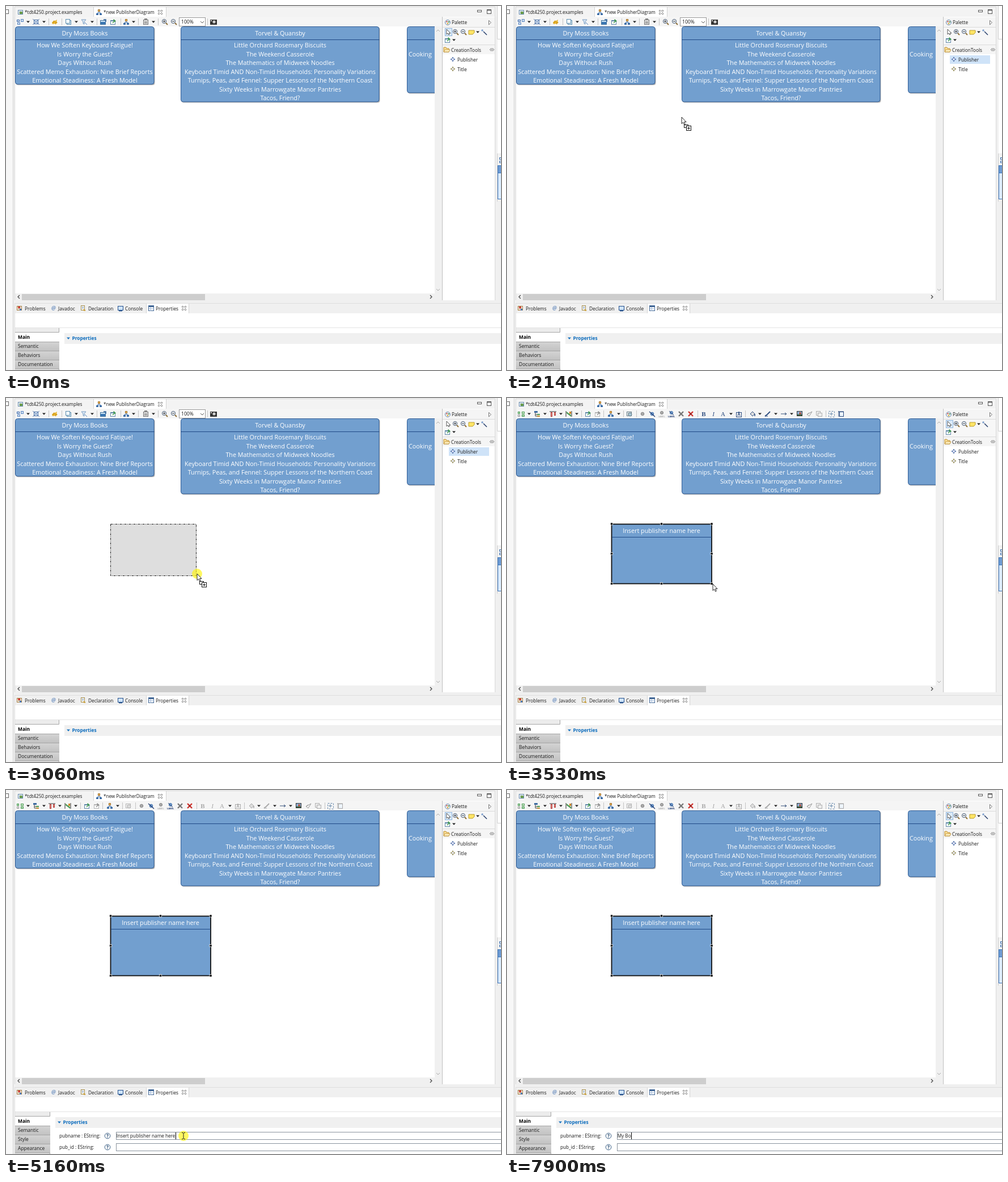
Write an HTML page that moves like this. It is 873x642 px and loops after 8 s.

```html
<!DOCTYPE html>
<html lang="en">
<head>
<meta charset="utf-8">
<title>Diagram editor</title>
<style>
  html, body { margin: 0; width: 100%; height: 100%; overflow: hidden; background: #f0f0f0; }
  svg { display: block; width: 873px; height: 642px; }
  text { font-family: "Open Sans", "Noto Sans", sans-serif; white-space: pre; }
</style>
</head>
<body>
<svg id="stage" viewBox="0 0 873 642"></svg>
<script>
const BLUE = '#729fcf', NAVY = '#204a87', INK = '#1a1a1a', GRAY = '#a8a8a8';
const LOOP = 8000;

// --- drawing helpers ---
const rect = (x, y, w, h, fill, more = '') =>
  `<rect x="${x}" y="${y}" width="${w}" height="${h}" fill="${fill}" ${more}/>`;
const frame = (x, y, w, h, stroke, fill = 'none', more = '') =>
  rect(x + .5, y + .5, w - 1, h - 1, fill, `stroke="${stroke}" ${more}`);
const path = (d, stroke, width = 1, fill = 'none') =>
  `<path d="${d}" stroke="${stroke}" stroke-width="${width}" fill="${fill}"/>`;
const shape = (d, fill) => path(d, 'none', 0, fill);
const dot = (x, y, r, fill, stroke = 'none') =>
  `<circle cx="${x}" cy="${y}" r="${r}" fill="${fill}" stroke="${stroke}"/>`;
const text = (s, x, y, size = 8.3, fill = INK, more = '') =>
  `<text x="${x}" y="${y}" font-size="${size}" fill="${fill}" ${more}>${s.replace(/&/g, '&amp;')}</text>`;
const label = (s, x, y, size = 10.8) => text(s, x, y, size, '#fff', 'text-anchor="middle"');
const group = (id, body, more = '') => `<g id="${id}" ${more}>${body}</g>`;

const boxes = (a, b) => frame(-6, -4, 5, 4, a, '#dce8f6') + frame(1, -5, 5, 5, b, '#cfe0f4') + frame(-5, 1, 5, 4, b, '#dce8f6');
const tree = c => frame(-2, -5, 4, 4, '#a06a20', '#f2c46a') + path('M0-1V1M-3 3V1H3V3', c) + rect(-5, 2, 4, 3, c) + rect(1, 2, 4, 3, c);
const pin = (c, edge) => frame(-5, -3, 9, 8, edge, '#fff') + rect(-5, -3, 9, 2, edge) + path('M-1 2L3-2', c, 1.5) + shape('M1-5L5-1L3 0L0-3Z', c);
const lens = sign => dot(-1, -1, 3.6, '#eef4fb', '#4a5a70') + path('M2 2L5 5', '#8a6a30', 1.8) + path(sign, '#333');
const letter = (s, c, style) => text(s, 0, 4, 11, c, `text-anchor="middle" style="font-family:'Liberation Serif',serif;${style}"`);
const cross = c => path('M-4-4L4 4M4-4L-4 4', c, 2.4);
const page = c => frame(-5, -4, 9, 8, c, '#fff') + path('M-3-1H2M-3 1H2', c);

const icons = {
  down: () => shape('M-3-1.5H3L0 1.7Z', '#222'),
  sep: () => path('M.5-6V6', '#c4c4c4'),
  layout: () => boxes('#3a66a8', '#5b86c0'),
  select: () => frame(-4, -4, 8, 8, '#4a6fa5', '#dfeaf7') + path('M-6-5L6 5M6-5L-6 5', '#4a6fa5', .8),
  refresh: () => shape('M-5 1L-1-3V-1L4-4L3 0L5 1L1 5V3L-4 4Z', '#e7b32c') + path('M-4 2L0-2M0 3L4 0', '#a87510', .8),
  layers: () => frame(-3, -3, 8, 8, '#5e8fb0', '#e8f4f8') + frame(-5, -5, 8, 8, '#5e8fb0', '#f2fafc'),
  filter: () => path('M-5-4H3L0 0V4L-2 3V0Z', '#7d9fc4', 1, '#d8e6f4') + path('M1 1L5 5', '#5b86c0'),
  image: () => frame(-5, -3, 10, 8, '#41719c', '#cfe6f6') + rect(-4, 0, 8, 4, '#3c78b4') + path('M1-4H5V0', '#2c5f96', 1.5),
  pin: () => pin('#3f9a4e', '#5f87a8'),
  pinOff: () => pin('#909090', '#b5b5b5'),
  tree: () => tree('#3d6ea8'),
  clip: () => frame(-4, -4, 9, 9, '#777', '#ddd') + rect(-2, -6, 5, 3, '#888') + path('M-2 0H3M-2 2H3', '#777'),
  zoomIn: () => lens('M-3-1H1M-1-3V1'),
  zoomOut: () => lens('M-3-1H1'),
  camera: () => rect(-6, -4, 12, 9, '#333') + dot(1, 0, 2.5, '#ddd', '#888') + rect(-5, -3, 2, 2, '#ddd'),
  green: () => frame(-6, -4, 4, 4, '#4b9a55', '#b9e0b8') + frame(1, -4, 5, 4, '#4b9a55', '#d6efd2') + frame(1, 1, 5, 4, '#4b9a55', '#b9e0b8') + frame(-6, 1, 4, 4, '#999', '#eee'),
  list: () => rect(-5, -5, 6, 3, '#3b6aa0') + path('M-3-2V4H0M-3 1H0', '#444') + rect(0, 0, 5, 2, '#4c9a50') + rect(0, 3, 5, 2, '#c08a30'),
  align: () => path('M-6-4H6', '#333') + frame(-4, -3, 3, 8, '#b03030', '#f0b0a0') + frame(2, -3, 3, 6, '#b03030', '#f0b0a0'),
  spread: () => path('M-5-5V5M5-5V5', '#333') + shape('M-4-4L4 2V5L-4-1Z', '#4d9a54') + rect(1, -4, 3, 4, '#d48a2a'),
  picture: () => page('#5c7480') + dot(1, 1, 3, '#a9c7d6', '#5c7480'),
  pictureOff: () => page('#b0b0b0') + dot(1, 1, 3, '#ddd', '#b0b0b0'),
  ball: () => dot(0, 0, 2.8, '#aaa', '#888'),
  hide: () => dot(0, 0, 2.8, '#7ba5d6', '#3d6ea8') + path('M-5-4L5 5', '#203a70', 1.3),
  tagOff: () => dot(0, -2, 2.6, '#aaa', '#888') + text('LABEL', -6, 6, 4, '#888'),
  tag: () => dot(0, -2, 2.6, '#7ba5d6', '#3d6ea8') + path('M-4-5L4 2', '#203a70') + text('LABEL', -6, 6, 4, '#203a70', 'font-weight="700"'),
  cross: () => cross('#777'),
  crossRed: () => cross('#d0302a') + dot(0, 0, 1.5, '#803030'),
  bold: c => letter('B', c, 'font-weight:700'),
  italic: c => letter('I', c, 'font-style:italic'),
  font: c => letter('A', c, ''),
  fontBox: c => frame(-5, -3, 10, 9, c) + path('M-2 4L0-4L2 4M-1 1H1', c),
  bucket: c => path('M-4 0L0-4L4 0L0 4Z', c, 1, '#ddd') + path('M4 0V4', c, 1.5),
  brush: c => path('M-5 4L-1 1L4-4', c, 1.8) + path('M-5 4H0', c),
  line: () => path('M-5 0H5M2-2L5 0L2 2', '#35507a'),
  photo: () => frame(-5, -5, 10, 9, '#333', '#8fb3d9') + dot(1, -1, 2, '#b0503a') + rect(-4, 1, 8, 2, '#3b5f3b'),
  undo: () => path('M5-4L-4 1L0 4M-4 1L0-2M5-4L0 4', '#999'),
  copy: () => frame(-5, -5, 8, 8, '#b0b0b0', '#eee') + frame(-2, -2, 8, 7, '#b0b0b0', '#eee'),
  expand: () => frame(-5, -5, 11, 11, '#6486aa', 'none', 'stroke-dasharray="3 2"') + path('M-3 0H3M0-3V3', '#6486aa'),
  resize: c => frame(-3, -4, 8, 9, c, '#eef5fc') + path('M-5-4H5M-4-5V5', c),
  close: () => path('M-3.5-3.5H-1.5L0-1.5L1.5-3.5H3.5V-2L1.8 0L3.5 2V3.5H1.5L0 1.5L-1.5 3.5H-3.5V2L-1.8 0L-3.5-2Z', '#777', .9, '#fff'),
  file: () => page('#5f87a8') + rect(-2, -1, 5, 4, '#6fa04a'),
  scroll: () => frame(-4, -5, 7, 9, '#a08a4a', '#fff') + path('M-2-2H1M-2 0H1', '#6f8db0') + path('M0 3L4 4', '#c89a2c', 2),
  at: () => text('@', -4, 3, 9, '#2f62a8', 'font-style="italic"'),
  monitor: () => frame(-5, -4, 10, 8, '#24508c', '#cfe4fa') + rect(-3, 4, 6, 1.4, '#24508c'),
  table: () => frame(-5, -5, 10, 10, '#3f6595', '#fff') + rect(-5, -5, 10, 3, '#3f6595') + path('M-1-2V5M-4 1H5', '#9db6d6'),
  alert: () => page('#a07838') + rect(-3, -3, 4, 3, '#d0403a') + rect(0, 1, 3, 3, '#4a78b8'),
  star: c => path('M0-4L1.2-1.2L4 0L1.2 1.2L0 4L-1.2 1.2L-4 0L-1.2-1.2Z', c, .9, '#eef'),
  arrow: () => path('M-3-5V4L-1 2L1 5L2 4L1 2H4Z', '#444', .9, '#fff'),
  note: () => path('M-5-3H5V1L2 4H-5Z', '#b99b2a', 1, '#ffe566'),
  wand: () => path('M-1-1L5 5', '#223a66', 1.4) + path('M-5-3H-1M-3-5V-1', '#5b86c0'),
  folder: () => path('M-5 4V-4H-1L0-2H4V4Z', '#b98a2c', 1, '#ffe39a') + path('M-5 4L-3 0H6L4 4Z', '#b98a2c', .8, '#fff0c0'),
  palette: () => dot(0, 0, 4.5, '#e9eef5', '#6f8db0') + dot(-1.5, -1.5, 1.3, '#d05a4a') + dot(2, -1, 1.3, '#4f9a54') + dot(0, 2, 1.3, '#e0b030'),
  help: () => dot(0, 0, 4.8, '#fff', '#3a5f86') + text('?', -2.1, 3.2, 8.5, '#24486e', 'font-weight="700"')
};
const icon = (name, x, y, color) => `<g transform="translate(${x} ${y})">${icons[name](color)}</g>`;
const bar = (spec, color) => spec.split(' ').map(item => {
  const [name, x] = item.split(':');
  return icon(name, +x, 28, color);
}).join('');

// --- diagram ---
const node = (x, w, h, title, lines, top = 73) => {
  const mid = x + w / 2;
  return rect(x + 1.5, 37.5, w - 1, h, '#b4b4b4', 'rx="4"') +
    rect(x + .5, 36.5, w - 1.5, h - .5, BLUE, `rx="4" stroke="#2f5c96"`) +
    path(`M${x} 59.5h${w - .5}`, NAVY) + label(title, mid, 52) +
    lines.map((s, i) => label(s, mid, top + i * 15.5)).join('');
};
const handles = () => [184.5, 272.5, 361].map(x => [222, 274.5, 327.5].map(y =>
  x === 272.5 && y === 274.5 ? '' : rect(x - 2, y - 2, 4, 4, '#000', 'stroke="#fff" stroke-width=".7"')).join('')).join('');

const diagram = rect(16, 36, 740, 471, '#fff') +
  `<clipPath id="view"><rect x="16" y="36" width="740" height="471"/></clipPath><g clip-path="url(#view)">` +
  node(16, 246, 102, 'Dry Moss Books', ['How We Soften Keyboard Fatigue!', 'Is Worry the Guest?', 'Days Without Rush',
    'Scattered Memo Exhaustion: Nine Brief Reports', 'Emotional Steadiness: A Fresh Model']) +
  node(308, 351, 133, 'Torvel & Quansby', ['Little Orchard Rosemary Biscuits', 'The Weekend Casserole',
    'The Mathematics of Midweek Noodles', 'Keyboard Timid AND Non-Timid Households: Personality Variations',
    'Turnips, Peas, and Fennel: Supper Lessons of the Northern Coast', 'Sixty Weeks in Marrowgate Manor Pantries',
    'Tacos, Friend?']) +
  node(707, 240, 117, '', []) + text('Cooking', 710, 88.5, 10.8, '#fff') +
  '</g>' +
  group('created', rect(184.5, 222.5, 176.5, 105, BLUE, 'stroke="#111" stroke-width="1.8"') +
    path('M185 245.5H361', NAVY) + label('Insert publisher name here', 272.5, 238) + handles());

// --- surrounding window ---
const tabs = rect(0, 0, 12, 642, '#f7f7f7') + path('M12.5 0V642', '#d2d2d2') + frame(-4, 6, 9, 8, '#666', '#fff') +
  rect(13, 0, 854, 19, '#f3f3f3') + path('M15.5 1V519M16 1.5H862M862.5 1V519', '#d8d8d8') +
  rect(155, 2, 127, 17, '#fff') + path('M154.5 2V19M282.5 2V19', '#d4d4d4') +
  icon('file', 26, 11) + text('*tdt4250.project.examples', 33, 14, 8.2) +
  icon('tree', 164, 11) + text('*new PublisherDiagram', 172, 14, 8.1) + icon('close', 272, 11) +
  frame(831, 7, 8, 4, '#555', '#fff') + frame(848, 6, 8, 8, '#555', '#fff') + path('M848 7.5H856', '#555') +
  rect(16, 19, 754, 17, '#f5f5f5');

const toolbarIdle = bar('layout:25 down:39 select:53 down:67 sep:75 refresh:86 sep:98 layers:110 down:124 filter:138 down:152 sep:160 image:171 pin:189 sep:202 tree:212 down:225 sep:233 clip:246 down:260 sep:268 zoomIn:280 zoomOut:296 sep:355 camera:366') +
  frame(305, 20, 47, 16, '#999', '#fff') + text('100%', 309, 31, 8.6) + path('M343 27L346 30L349 27', '#555');
const toolbarNode = bar('green:25 down:39 list:53 down:67 align:81 down:95 spread:109 down:123 sep:131 pin:143 pinOff:160 sep:170 tree:183 down:197 sep:205 sep:228 ball:239 hide:256 tagOff:273 tag:290 cross:307 crossRed:324 sep:336 down:395 sep:420 down:446 down:474 line:488 down:502 photo:516 undo:533 copy:550 sep:562 expand:572');
const STYLES = 'bold:347 italic:364 font:381 fontBox:409 bucket:433 brush:460 resize:589 ';

const scrollbars = rect(756, 36, 13, 483, '#f0f0f0') + rect(16, 507, 740, 12, '#f0f0f0') +
  rect(28, 508, 323, 11, '#cdcdcd') +
  path('M24 510L21 513L24 516M748 510L751 513L748 516', '#444', 1.3) +
  path('M759 45L762 42L765 45M759 499L762 502L765 499', '#aaa');

const palette = rect(770, 19, 92, 500, '#fff') + path('M769.5 19V519', '#c0c0c0') +
  rect(770, 20, 92, 17, '#f5f5f5') + icon('palette', 779, 29) + text('Palette', 786, 32, 8.4) +
  path('M851.5 25.5V33L855.5 29.2Z', '#666', .9, '#fff') + path('M770 37.5H862M770 68.5H862', '#dadada') +
  rect(770, 38, 92, 30, '#f7f7f7') +
  group('pointerTool', frame(774, 39, 13, 14, '#8eb4dc', '#dcebfa')) + icon('arrow', 780, 46) +
  icon('zoomIn', 793, 46) + icon('zoomOut', 807, 46) + icon('note', 821, 46) + icon('down', 832, 46) + icon('wand', 843, 46) +
  icon('pin', 779, 60) + icon('down', 790, 60) +
  rect(770, 69, 92, 16, '#f5f5f5') + icon('folder', 777, 77) + text('CreationTools', 785, 80.5) +
  path('M853 77L856 74.5V79.5ZM861 77L858 74.5V79.5Z', '#777', .8) +
  group('picked', rect(781, 87, 71, 15, '#cfe3f8')) +
  icon('star', 788, 94, '#3a5f9c') + text('Publisher', 796, 97.5, 8.2) +
  icon('star', 788, 111, '#8a8140') + text('Title', 796, 114.5, 8.5);

const edge = rect(867, 0, 6, 260, '#fff') + path('M866.5 0V58M866.5 58.5H873M866.5 260V345', '#cfcfcf') +
  rect(868, 262, 5, 18, '#f5f5f5') + frame(870, 267, 5, 4, '#3a6fb0') + frame(870, 273, 5, 4, '#3a6fb0') +
  frame(867, 281, 10, 60, '#3a75bd', '#dcecfc') + rect(868, 282, 5, 12, '#6d9bd3') + path('M867 294.5H873', '#3a75bd');

const views = rect(13, 519, 860, 23, '#f0f0f0') + path('M15.5 524V642M16 524.5H873', '#dedede') +
  rect(248, 525, 74, 17, '#fff') + path('M247.5 525V542M322.5 525V542', '#d4d4d4') +
  [['alert', 24, 'Problems', 33], ['at', 84, 'Javadoc', 92], ['scroll', 136, 'Declaration', 145], ['monitor', 202, 'Console', 210], ['table', 256, 'Properties', 264]]
    .map(([name, x, s, left]) => icon(name, x, 533) + text(s, left, 536.5)).join('') + icon('close', 314, 533) +
  rect(16, 542, 857, 100, '#fff') + path('M16 567.5H873', '#e4e4e4');

const sheet = (id, right, names) => group(id,
  rect(16, 568, right - 16, 7, '#ececec') + path(`M16 575.5H${right - .5}V568M${right - .5} 592V642`, '#a5a5a5') +
  text('Main', 21, 586.5, 8.4, '#000', 'font-weight="700"') +
  names.map((s, i) => rect(16, 592 + 16 * i, right - 16, 16, 'url(#sideTab)') +
    path(`M16 ${592.5 + 16 * i}H${right}`, '#a5a5a5') + text(s, 21, 603 + 16 * i, 8.5)).join('') +
  path(`M16 640.5H${right}`, '#a5a5a5') +
  rect(right + 9, 577, 873, 19, '#f0f0f0') + shape(`M${right + 13} 584.5h6l-3 3.6z`, '#1a74c0') +
  text('Properties', right + 22.5, 589, 8.3, '#0b6cbd', 'font-weight="700"'));

const field = (y, s) => text(s, 94, y + 3.2, 8.2) + icon('help', 179, y) + frame(194, y - 7, 690, 14, '#8a949e', '#fff');
const form = group('form', field(610, 'pubname : EString:') + field(630, 'pub_id : EString:') +
  text('', 194.7, 613.2, 8.2, INK, 'id="value"') +
  group('selection', rect(194.5, 604, 104, 12, '#0078d7') +
    text('Insert publisher name here', 194.7, 613.2, 8.2, '#fff'), 'clip-path="url(#marked)"') +
  '<clipPath id="marked"><rect id="markedBox" y="600" height="20" width="200"/></clipPath>' +
  rect(0, 604, 1, 12, '#000', 'id="caret"'));

const pointer = rect(184.5, 222.5, 1, 1, '#dedede', 'id="band" stroke="#222" stroke-dasharray="4 1.5 1 1.5"') +
  group('pointer', dot(0, 0, 9, 'rgba(255,245,20,.68)').replace('<circle', '<circle id="glow"') +
    group('arrow', path('M0 0V11.6L2.6 9.2L4.5 13.3L6.3 12.5L4.5 8.5H8Z', '#111', .9, '#fff')) +
    group('badge', frame(4, 13, 8, 6, '#111', '#fff') + frame(8, 15, 9, 9, '#111', '#fff') + path('M10 19.5H15M12.5 17V22', '#111')) +
    group('beam', path('M-3-5.5H-1L0-4.5L1-5.5H3M0-5V5M-3 5.5H-1L0 4.5L1 5.5H3', '#222')));

const stage = document.getElementById('stage');
stage.innerHTML = '<linearGradient id="sideTab" x2="0" y2="1"><stop stop-color="#d4d4d4"/><stop offset="1" stop-color="#c2c2c2"/></linearGradient>' +
  rect(0, 0, 873, 642, '#f0f0f0') + tabs + group('toolbarIdle', toolbarIdle) +
  group('toolbarNode', toolbarNode + group('stylesOn', bar(STYLES + 'picture:216', '#2d4d80')) +
    group('stylesOff', bar(STYLES + 'pictureOff:216', GRAY))) +
  diagram + scrollbars + palette + edge + views +
  sheet('sheetDiagram', 94, ['Semantic', 'Behaviors', 'Documentation']) +
  sheet('sheetNode', 78, ['Semantic', 'Style', 'Appearance']) + form + pointer;

// --- motion ---
const el = Object.fromEntries([...stage.querySelectorAll('[id]')].map(n => [n.id, n]));
const show = (id, on) => { el[id].style.display = on ? '' : 'none'; };
const set = (id, attrs) => { for (const k in attrs) el[id].setAttribute(k, attrs[k]); };

// start, end, steps, x, y, easing power for x and y
const moves = [
  [200, 350, 3, 798, 286], [590, 760, 3, 790, 104], [990, 1370, 6, 800, 91, .6, .6],
  [1600, 2310, 10, 185, 222], [2460, 3230, 11, 363, 328, .78, .95], [3600, 3990, 6, 244, 424],
  [4230, 5000, 11, 313, 610], [5310, 5710, 6, 157, 605]
];
function position(t) {
  let x = 840, y = 667;
  for (const [start, end, steps, toX, toY, powerX = 1, powerY = 1] of moves) {
    if (t < start) break;
    const step = Math.floor((t - start) / (end - start) * (steps - 1) + .2) + 1;
    const p = Math.min(1, step / steps);
    x += (toX - x) * p ** powerX;
    y += (toY - y) * p ** powerY;
  }
  return [x, y];
}
const keys = [[7280, 'M'], [7510, 'My'], [7580, 'My '], [7830, 'My B'], [7900, 'My Bo']];

function draw(t) {
  const within = (a, b) => t >= a && t < b;
  const [x, y] = position(t);
  const made = t >= 3370, sheetReady = t >= 3680, focused = t >= 5070;
  const typed = keys.filter(k => t >= k[0]).pop();

  show('picked', within(1140, 3370));
  show('pointerTool', !within(1140, 3370));
  show('created', made);
  show('toolbarIdle', !made);
  show('toolbarNode', made);
  show('stylesOn', !focused);
  show('stylesOff', focused);
  show('sheetDiagram', !sheetReady);
  show('sheetNode', sheetReady);
  show('form', sheetReady);

  const dragging = within(2460, 3370);
  show('band', dragging);
  if (dragging) set('band', { width: Math.round(x - 186), height: Math.min(105, Math.round(y - 218.5)) });

  const inField = t > 4500 && x > 194 && y > 600;
  show('pointer', within(200, 7280));
  set('pointer', { transform: `translate(${Math.round(x)} ${Math.round(y)})` });
  show('glow', within(1140, 1370) || within(2460, 3290) || within(5070, 5710));
  show('badge', within(1600, 3370) && x < 756);
  show('arrow', !inField);
  show('beam', inField);

  el.value.textContent = typed ? typed[1] : 'Insert publisher name here';
  const selecting = within(5310, 7280);
  const markX = Math.max(194, x);
  show('selection', selecting);
  set('markedBox', { x: markX });
  const blink = t < 6030 || within(6580, 7110) || t >= 7280;
  show('caret', focused && blink);
  if (focused) {
    const textEnd = 195 + el.value.getComputedTextLength();
    set('caret', { x: Math.round(selecting ? Math.min(markX + 1, textEnd) : textEnd) });
  }
}

const begin = performance.now();
function tick() {
  draw((performance.now() - begin) % LOOP);
  requestAnimationFrame(tick);
}
tick();
</script>
</body>
</html>
```
